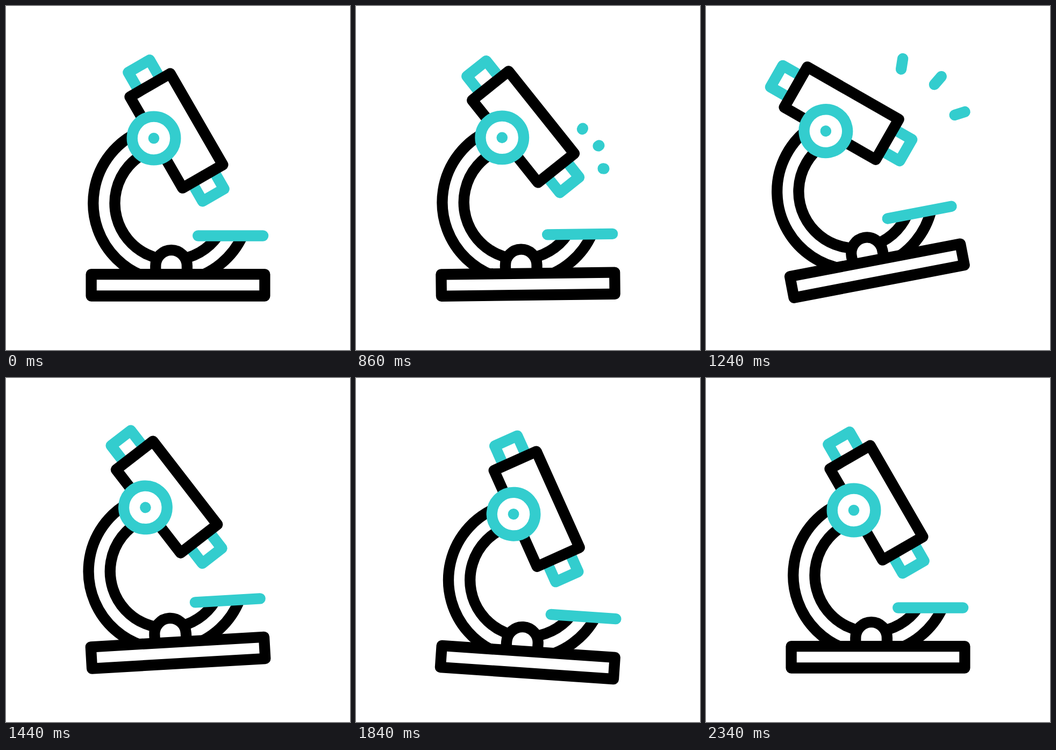
Animation, 640 px wide and 640 px high, one loop 3000 ms. Source, as an HTML page:

```html
<!DOCTYPE html>
<html lang="en">
<head>
<meta charset="utf-8">
<title>Microscope</title>
<style>
  html, body { margin: 0; width: 100%; height: 100%; overflow: hidden; background: #fff; }
  svg { display: block; width: 100%; height: 100%; fill: #fff; stroke: #000; stroke-width: 20.3; stroke-linejoin: round; }
  .teal { stroke: #33cdce; }
  .round { stroke-linecap: round; }
  .dot { fill: #33cdce; stroke: none; }
</style>
</head>
<body>
<svg viewBox="0 0 640 640">
  <g id="body">
    <g fill="none">
      <path d="M245 235.5A145.5 145.5 0 1 0 440 427.5"/>
      <path d="M265 270.5A105.5 105.5 0 1 0 394.3 427.5"/>
    </g>
    <path d="M278.3 499V483.5a29.3 29.3 0 0 1 58.6 0V499"/>
    <rect x="158.6" y="499.2" width="322.8" height="40.3"/>
    <path class="teal round" d="M357.2 427.5H478.2"/>
    <g transform="translate(275 246)">
      <!-- the tube stands upright here, with the knob's centre as origin -->
      <g id="tube">
        <path class="teal" d="M20-89V-130H66V-89M20 107V147H66V107"/>
        <rect y="-89" width="86.5" height="196"/>
        <g id="rays" class="teal round" transform="translate(52.5 109)">
          <line transform="rotate(-20.8)"/>
          <line transform="rotate(10.8)"/>
          <line transform="rotate(42.4)"/>
        </g>
      </g>
      <circle class="teal" r="40.3"/>
      <circle class="dot" r="10.3"/>
    </g>
  </g>
</svg>
<script>
const LOOP = 3000;
const RAY_START = 79, RAY_TRAVEL = 76;

const body = document.getElementById("body");
const tube = document.getElementById("tube");
const rays = document.getElementById("rays");

// Progress from 0 to 1 between two times, with three kinds of easing.
const linear = (t, from, to) => Math.min(1, Math.max(0, (t - from) / (to - from)));
const swing = (t, from, to) => (1 - Math.cos(Math.PI * linear(t, from, to))) / 2;
const settle = (t, from, to) => 1 - (1 - linear(t, from, to)) ** 2;

const tilt = t =>
  -12 * swing(t, 810, 1140) + 18 * swing(t, 1140, 1755) - 6 * settle(t, 1755, 2200);

const lean = t =>
  30 - 12 * swing(t, 200, 600) + 31.4 * swing(t, 600, 1045) - 29.7 * swing(t, 1240, 1640)
  + 14.1 * swing(t, 1640, 2000) - 3.8 * swing(t, 2000, 2340);

function draw(t) {
  body.setAttribute("transform", `rotate(${tilt(t)} 178.5 514.5)`);
  tube.setAttribute("transform", `rotate(${-lean(t)})`);

  const head = RAY_TRAVEL * linear(t, 850, 1300);
  const tail = RAY_TRAVEL * linear(t, 968, 1418);
  rays.setAttribute("visibility", head > tail ? "visible" : "hidden");
  for (const ray of rays.children) {
    ray.setAttribute("x1", RAY_START + tail);
    ray.setAttribute("x2", RAY_START + head);
  }
}

const start = performance.now();
function tick() {
  draw((performance.now() - start) % LOOP);
  requestAnimationFrame(tick);
}
tick();
</script>
</body>
</html>
```
